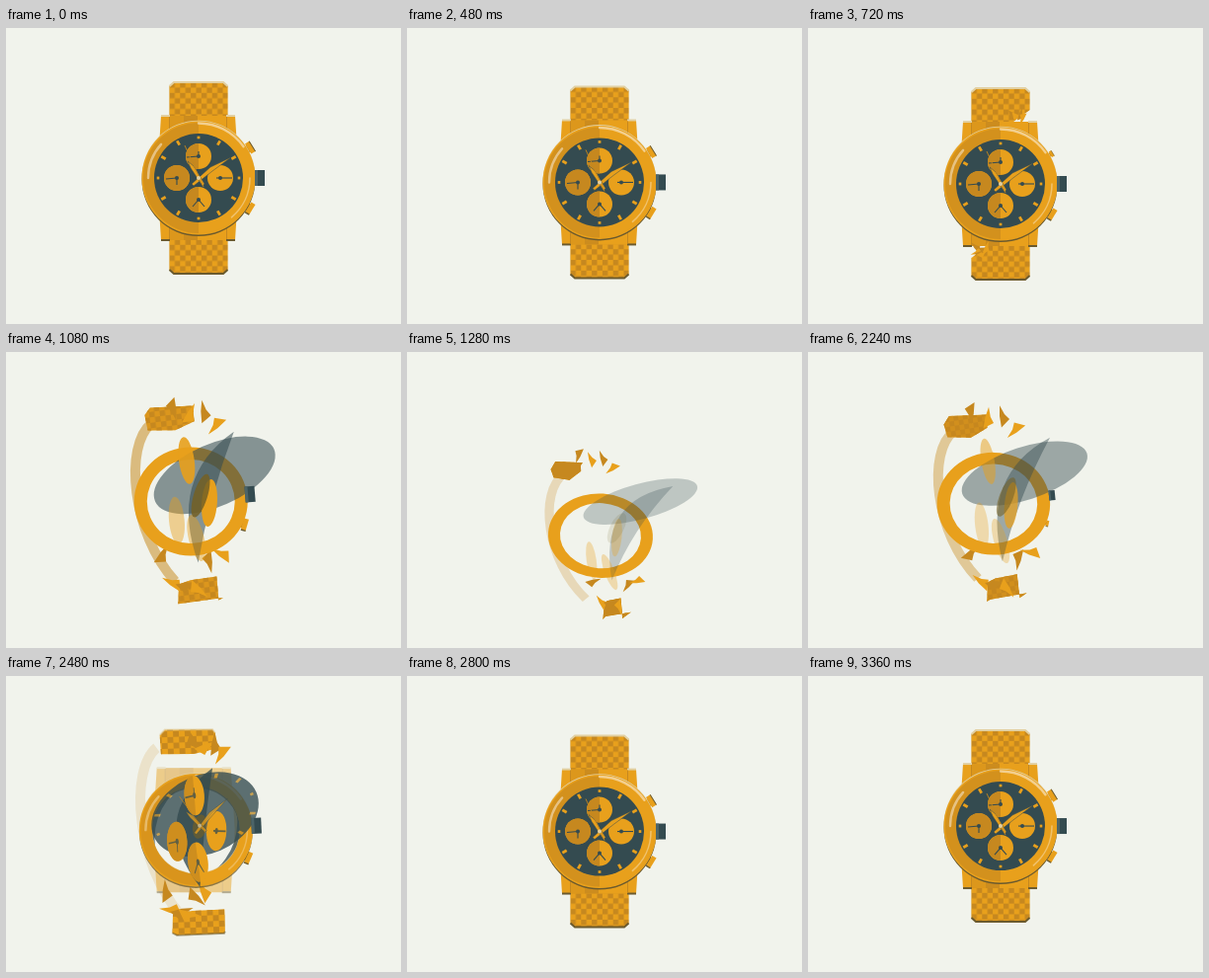
Animation, 400 px wide and 300 px high, one loop 3.4 s. Source, as an HTML page:

```html
<!DOCTYPE html>
<html lang="en">
<head>
<meta charset="utf-8">
<title>Watch</title>
<style>
  html, body { margin: 0; width: 100%; height: 100%; overflow: hidden; background: #f1f3ec; }
  svg { display: block; width: 100vw; height: 100vh; }
</style>
</head>
<body>
<svg id="stage" viewBox="0 0 400 300"></svg>
<script>
const LOOP = 3400, STEP = 40, BREAK = 720, GONE = 1400;
const GOLD = '#e8a01c', BRONZE = '#c6881f', SHADOW = '#6b5a2e', PALE = '#e2d0a2', SLATE = '#344b50';

const stage = document.getElementById('stage');
const set = (node, attrs) => { for (const name in attrs) node.setAttribute(name, attrs[name]); };
function el(tag, attrs, parent) {
  const node = document.createElementNS('http://www.w3.org/2000/svg', tag);
  set(node, attrs);
  parent.appendChild(node);
  return node;
}

const ramp = (p, from, to) => Math.max(0, Math.min(1, (p - from) / (to - from)));
const smooth = v => v * v * (3 - 2 * v);

// Shared curves of the toss; s runs from 0 (intact) to 1 (off stage).
const settle = s => Math.sin(s * Math.PI / 2);
const swell = s => Math.sin(Math.PI * s ** 1.4);
const spread = s => 1 + 0.5 * s - 0.9 * s * s;
const haze = s => 1 - 0.93 * s ** 1.2;
const sway = s => 10 * s ** 3 - 10 * swell(s) ** 2;
const fall = s => 230 * s ** 6 - 78 * s ** 3;
const spin = s => [1 - 0.8 * s ** 12, 1 - 0.56 * s ** 4];

function randomizer(seed) {
  return () => {
    seed = (seed * 16807) % 2147483647;
    return seed / 2147483647 * 2 - 1;
  };
}

const root = el('g', {}, stage);
const updates = [];
const details = [];

// A group resting at an offset from the watch centre that drifts, turns, scales and fades with s.
function part({ at = [0, 0], drift = [0, 0], turn = () => 0, scale = () => [1, 1], opacity = () => 1 }) {
  const group = el('g', {}, root);
  updates.push((s, p) => {
    const x = at[0] + drift[0] * smooth(s);
    const y = at[1] * spread(s) + drift[1] * settle(s);
    set(group, {
      transform: `translate(${x} ${y}) rotate(${turn(s)}) scale(${scale(s, p)})`,
      opacity: opacity(s, p)
    });
  });
  return group;
}
function detail(parent) {
  const group = el('g', {}, parent);
  details.push(group);
  return group;
}
function line(x1, y1, x2, y2, stroke, width, parent) {
  return el('line', { x1, y1, x2, y2, stroke, 'stroke-width': width }, parent);
}
function arc(r, from, to, width, opacity, parent) {
  const at = a => `${r * Math.cos(a * Math.PI / 180)} ${r * Math.sin(a * Math.PI / 180)}`;
  el('path', { d: `M${at(from)}A${r} ${r} 0 0 1 ${at(to)}`, fill: 'none', stroke: '#fff',
    'stroke-width': width, opacity, 'stroke-linecap': 'round' }, parent);
}
const circle = r => `M${-r} 0A${r} ${r} 0 1 1 ${r} 0A${r} ${r} 0 1 1 ${-r} 0Z`;

const defs = el('defs', {}, stage);

// Checkered strap half: side -1 is the top, 1 the bottom.
function strap(side, drift, edgeColor, seed) {
  const cell = 5.4, id = `cloth${seed}`, random = randomizer(seed);
  const pattern = el('pattern', { id, width: 2 * cell, height: 2 * cell, patternUnits: 'userSpaceOnUse' }, defs);
  for (const at of [0, cell]) el('rect', { x: at, y: at, width: cell, height: cell, fill: BRONZE }, pattern);

  const group = part({
    at: [0, 77 * side], drift,
    turn: s => -14 * swell(s) * s,
    scale: s => [1 - 0.87 * s * s, 1 - 0.8 * s * s]
  });
  const [base, cloth, dark] = [GOLD, `url(#${id})`, BRONZE].map(fill => el('polygon', { fill }, group));
  const rim = el('polyline', { fill: 'none', stroke: edgeColor, 'stroke-width': 2 }, group);
  const jitter = Array.from({ length: 7 }, () => [random(), random()]);

  updates.push((s, p) => {
    const crack = 17 * ramp(p, 620, BREAK), torn = 14 * ramp(p, BREAK, 920);
    const outline = [[-29.5, -16], [-25, -20], [25, -20], [29.5, -16],
      [29.5, 19 - crack], [6, 19 - torn], [-29.5, 19 - torn]];
    const corners = outline.map(([x, y], i) => [
      -side * x + jitter[i][0] * 22 * s * s,
      -side * y + jitter[i][1] * 22 * s * s
    ]);
    for (const shape of [base, cloth, dark]) set(shape, { points: corners.join(' ') });
    set(dark, { opacity: ramp(p, 960, 1260) });
    set(rim, { points: corners.slice(0, 4).join(' '), opacity: 1 - ramp(p, 860, 1000) });
    set(pattern, { patternTransform: `translate(-29.5 -20) scale(${1 + 0.6 * s})` });
  });
}

// Splinters flying off a crack
function splinters(count, at, drift, seed) {
  const random = randomizer(seed), group = part({ at, drift });
  for (let i = 0; i < count; i++) {
    const piece = el('polygon', { points: '-1.2,.5 .1,-.4 1.4,-1 .6,.1 .3,1', fill: i % 2 ? GOLD : BRONZE }, group);
    const x = i / (count - 1) - 0.5, y = random() * 0.3, angle = random() * 180, twist = random() * 200;
    updates.push((s, p) => {
      const size = 8 * ramp(p, 620, 800) * (1 - s ** 6);
      const reach = 10 + 9 * count * swell(s);
      set(piece, { transform: `translate(${x * reach} ${y * reach}) rotate(${angle + twist * s}) scale(${size})` });
    });
  }
}

// Faded sweep left by the case
const sweepGroup = part({
  scale: s => [1 - 0.8 * s ** 12, spread(s)],
  opacity: (s, p) => 0.58 * ramp(p, 860, 1060) * (1 - 0.85 * ramp(p, 1060, GONE))
});
el('path', { d: 'M-40-78C-68-56-60 32-16 80', fill: 'none', stroke: '#c98f28', 'stroke-width': 10 }, sweepGroup);

strap(-1, [-34, 0], PALE, 11);
strap(1, [16, 12], SHADOW, 29);

// Lugs, open behind the dial
const lugs = part({ drift: [-8, 0], opacity: (s, p) => 1 - ramp(p, 760, 1060) });
const hole = circle(50);
const lugPath = (d, opacity, fill) => el('path', { d: d + hole, 'fill-rule': 'evenodd', fill, opacity }, lugs);
lugPath('M-38-63H37L41 0 37 63H-38L-42 0Z', 1, GOLD);
for (const side of [-1, 1]) {
  el('rect', { x: -30, y: side * 56.5 - 6.5, width: 15, height: 13, fill: BRONZE, opacity: .35 }, lugs);
  el('rect', { x: -15, y: side * 56.5 - 6.5, width: 14, height: 13, fill: BRONZE, opacity: .8 }, lugs);
  for (const x of [-38, 28]) line(x, 63 * side, x + 9, 63 * side, side < 0 ? PALE : SHADOW, 2, lugs);
  for (const x of [-29.5, 28.5]) line(x, 62 * side, x, 42 * side, BRONZE, 1, lugs);
}

splinters(4, [18, -68], [-24, -18], 5);
splinters(6, [-20, 68], [38, 6], 17);

// Pushers
function pusher(side, vanish) {
  const group = part({
    at: [51, 30 * side], drift: [4, -10],
    turn: s => side * (32 - 30 * s),
    scale: (s, p) => { const k = 1 - ramp(p, ...vanish); return [k, k]; }
  });
  el('rect', { x: -5, y: -4, width: 6, height: 8, fill: BRONZE }, group);
  el('rect', { x: -1, y: -6, width: 5, height: 12, fill: GOLD }, group);
  if (side < 0) line(4, -6, 4, 6, SHADOW, 1, group);
  else line(-1, 6, 4, 6, SHADOW, 1.4, group);
}
pusher(-1, [600, 860]);
pusher(1, [1080, 1240]);

// Inner wall of the case, uncovered as the dial lifts
const wall = detail(part({ scale: spin }));
el('path', { d: circle(46) + 'M-16-43A36 46 20 1 1 16 43A36 46 20 1 1-16-43Z', fill: SLATE, 'fill-rule': 'evenodd' }, wall);

// Bezel
const bezel = part({ scale: spin, turn: s => 12 * s ** 6 });
const hoop = circle(57.5) + circle(44.5);
const rims = detail(bezel);
const ring = (fill, y, parent) =>
  el('path', { d: hoop, fill, 'fill-rule': 'evenodd', transform: `translate(0 ${y})` }, parent);
ring(SHADOW, 1.5, rims);
ring(PALE, -.8, rims);
ring(GOLD, 0, bezel);
const shine = detail(bezel);
el('path', { d: 'M0-56A56 56 0 0 0 0 56V44.5A44.5 44.5 0 0 1 0-44.5Z', fill: BRONZE, opacity: .6 }, shine);
arc(55.5, -90, -35, 2.4, .5, shine);
arc(51, 180, 222, 2.4, .45, shine);
arc(52, 0, 50, 1.6, .35, shine);

// Dial
const dial = part({
  drift: [44, -36],
  turn: s => -26 * Math.sin(3.8 * s) - 86 * s ** 9,
  scale: s => [1 + 0.48 * swell(s), 1 - 0.82 * s ** 1.6],
  opacity: haze
});
el('circle', { r: 45, fill: SLATE }, dial);
const ticks = detail(dial);
for (let hour = 0; hour < 12; hour++) {
  const long = hour % 3 ? 5 : 2.6;
  el('rect', { x: -1.4, y: -41 - long / 2, width: 2.8, height: long, fill: GOLD,
    transform: `rotate(${hour * 30})` }, ticks);
}

// Shaded half of the dial, set loose
const blade = el('path', { fill: SLATE }, root);
updates.push((s, p) => {
  const tall = swell(s), h = spread(s);
  const top = [80 * smooth(s), -(45 + 26 * tall) * h];
  const foot = [14 * s, (45 + 17 * tall) * h];
  const outer = [90 * settle(s) - 90, -45 * s], inner = [46 * s - 6, -8 * s];
  set(blade, { d: `M${top}Q${outer} ${foot}Q${inner} ${top}Z`, opacity: haze(s) * ramp(p, BREAK, 860) });
});

// Crown
const crown = part({
  at: [62, 0], drift: [-4, -10], turn: s => -9 * s,
  scale: (s, p) => { const k = 1 - ramp(p, 1100, 1260); return [k, k]; }
});
el('rect', { x: -5, y: -8, width: 10, height: 16, fill: SLATE }, crown);
el('rect', { x: -5, y: -8, width: 3, height: 16, fill: '#4c6468' }, crown);

// Small dials stretch into leaves; each hand is [x, y] from the centre.
const LEFT_HALF = 'M0-13A13 13 0 0 0 0 13Z';
function subdial({ at, drift, lean, shade, hands, fade, rest }) {
  const group = part({
    at, drift,
    turn: s => lean * s,
    scale: s => [1 - 0.75 * s, 1 + 1.2 * swell(s) * (1 - 0.5 * s)],
    opacity: (s, p) => 1 - (1 - rest) * ramp(p, fade, fade + 200)
  });
  el('circle', { r: 13, fill: GOLD }, group);
  const marks = detail(group);
  if (shade) el('path', { d: shade, fill: BRONZE }, marks);
  for (const [x, y] of hands) line(0, 0, x, y, SLATE, 1.1, marks);
  el('circle', { r: 2, fill: SLATE }, marks);
}
subdial({ at: [0, -22], drift: [-8, -26], lean: -15, shade: LEFT_HALF, hands: [[-12, 1], [0, -5]], fade: 1060, rest: 0 });
subdial({ at: [-22, 0], drift: [14, 26], lean: -10, shade: circle(13), hands: [[-11, 1], [0, 7]], fade: 920, rest: .3 });
subdial({ at: [0, 22], drift: [10, 20], lean: -25, shade: LEFT_HALF, hands: [[-6, 7], [6, 7]], fade: 920, rest: .3 });
subdial({ at: [22, 0], drift: [-6, 2], lean: 8, hands: [[12, 0], [-4, 0]], fade: 1080, rest: .3 });

const hub = part({
  drift: [18, -8],
  turn: s => 32 * s,
  scale: (s, p) => [7, 25 * ramp(p, 800, 1040) * (1 - 0.6 * s ** 3)],
  opacity: (s, p) => 0.85 * ramp(p, 800, 960) * (1 - ramp(p, 1080, 1320))
});
el('circle', { r: 1, fill: '#756125' }, hub);

// Main hands
const hands = detail(part({ drift: [18, -10], turn: s => -40 * s }));
for (const points of ['-7,6 -5,8 14,-7 33,-21 12,-11', '4,8 6,6 -5,-12 -11,-17 -8,-10']) {
  el('polygon', { points, fill: GOLD, stroke: SLATE, 'stroke-width': .5 }, hands);
}
line(5, 9, -14, -33, BRONZE, .9, hands);
el('circle', { r: 2, fill: PALE }, hands);

// The second half of the loop replays the first backwards.
function draw(time) {
  const t = Math.floor((time % LOOP) / STEP) * STEP;
  const p = Math.min(t, LOOP - t), s = ramp(p, BREAK, GONE);
  root.style.display = p > GONE ? 'none' : '';
  const dip = 6 * smooth(ramp(p, 0, BREAK));
  set(root, { transform: `translate(${195 + sway(s)} ${152 + dip + fall(s)})` });
  for (const group of details) set(group, { opacity: 1 - ramp(p, 880, 1040) });
  for (const update of updates) update(s, p);
}

const start = performance.now();
function tick() {
  draw(performance.now() - start);
  requestAnimationFrame(tick);
}
tick();
</script>
</body>
</html>
```
